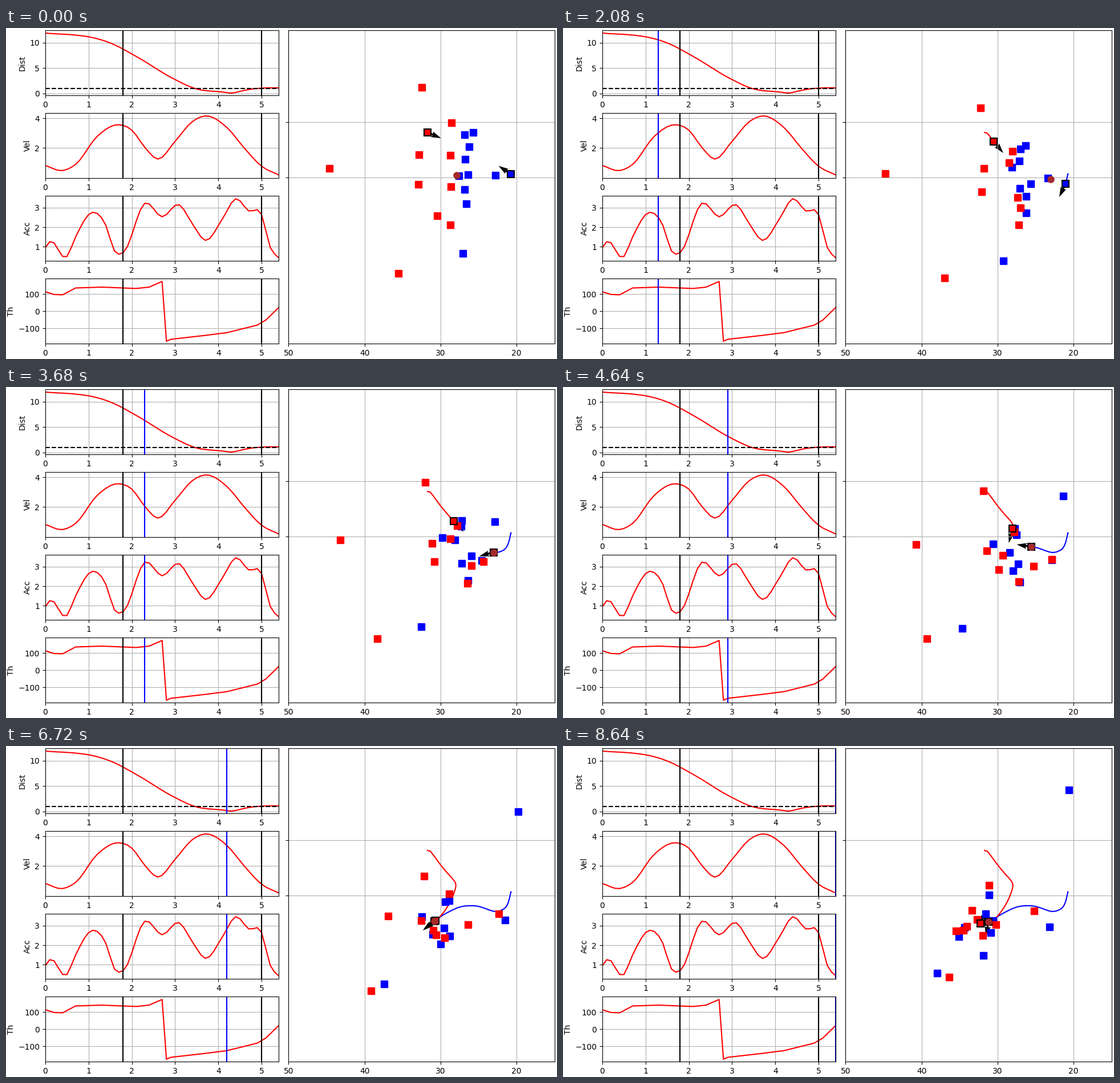
A matplotlib script that plays this animation: 966x580 px, repeating every 8.8 s.

```python
import numpy as np
import matplotlib.pyplot as plt
from matplotlib.animation import FuncAnimation

W, H, DPI = 966, 580, 100
STEPS, DT = 55, 0.1
T = np.arange(STEPS) * DT
YARD = np.array([13.33, 15.69])  # pixels per yard across and down the field


def spline(*keys):
    """Smooth curve through (time, value...) keys, sampled at every step."""
    keys = np.array(keys, float)
    k, v = keys[:, 0], keys[:, 1:]
    slope = np.gradient(v, k, axis=0)
    i = np.clip(np.searchsorted(k, T, side="right") - 1, 0, len(k) - 2)
    h = (k[i + 1] - k[i])[:, None]
    u = np.clip((T - k[i])[:, None] / h, 0, 1)
    out = ((1 + 2 * u) * (1 - u) ** 2 * v[i] + u * (1 - u) ** 2 * h * slope[i]
           + u * u * (3 - 2 * u) * v[i + 1] + u * u * (u - 1) * h * slope[i + 1])
    return out.squeeze()


def route(start, *points):
    """Player path: leaves at `start`, then passes the later points in turn."""
    return spline(*[(t, *p) for t, p in zip((start, 1.8, 3.7, 5.4), points)])


def polar(angle):
    return np.column_stack([np.cos(angle), np.sin(angle)])


SNAP = 0.6
blue = np.array([
    route(SNAP, (819, 183), (805, 221), (780, 264), (741, 294)),
    route(SNAP, (804, 187), (800, 229), (787, 271), (747, 261)),
    route(SNAP, (812, 208), (793, 250), (775, 312), (750, 327)),
    route(SNAP, (805, 230), (775, 254), (739, 290), (704, 318)),
    route(SNAP, (794, 259), (803, 296), (772, 338), (737, 367)),
    route(SNAP, (810, 257), (823, 284), (768, 325), (694, 334)),
    route(SNAP, (858, 258), (848, 259), (897, 136), (887, 77)),
    route(SNAP, (804, 283), (819, 302), (877, 302), (853, 317)),
    route(SNAP, (807, 308), (813, 333), (787, 340), (754, 306)),
    route(SNAP, (801, 395), (751, 415), (671, 422), (656, 398)),
])
red = np.array([
    route(0, (729, 104), (733, 154), (737, 207), (717, 288)),
    route(0, (781, 166), (790, 231), (786, 261), (747, 244)),
    route(SNAP, (724, 222), (745, 261), (735, 300), (708, 316)),
    route(SNAP, (779, 223), (783, 247), (758, 322), (726, 304)),
    route(SNAP, (567, 246), (569, 262), (658, 288), (689, 324)),
    route(SNAP, (723, 274), (741, 296), (767, 331), (702, 323)),
    route(SNAP, (780, 278), (807, 308), (824, 313), (759, 313)),
    route(0, (756, 329), (819, 310), (871, 297), (826, 289)),
    route(SNAP, (779, 345), (809, 345), (781, 338), (736, 332)),
    route(0, (688, 430), (661, 440), (632, 436), (677, 405)),
])

vel = spline((0, 0.83), (0.4, 0.49), (0.7, 0.9), (1.2, 2.78), (1.7, 3.56), (2, 3.2),
             (2.3, 2.05), (2.6, 1.26), (3, 2.45), (3.4, 3.77), (3.7, 4.15),
             (4.2, 3.37), (4.6, 2), (5, 0.78), (5.4, 0.19))
acc = spline((0, 0.95), (0.1, 1.26), (0.5, 0.5), (0.7, 1.5), (1.1, 2.77), (1.4, 2.1),
             (1.6, 0.78), (1.8, 0.7), (2.3, 3.23), (2.7, 2.54), (3.1, 3.15),
             (3.4, 2.18), (3.7, 1.33), (4.1, 2.45), (4.4, 3.46), (4.7, 2.84),
             (5, 2.65), (5.2, 0.97), (5.4, 0.43))
turn = np.interp(T, [0, 0.2, 0.4, 0.7, 1.3, 2.1, 2.4, 2.7, 2.9, 3.7, 4.2, 4.9, 5.1, 5.4],
                 [113, 97, 95, 135, 140, 132, 140, 173, 195, 218, 234, 278, 308, 382])
theta = (turn + 180) % 360 - 180

# The chaser's path follows from its speed and heading.
chaser_dir = polar(np.radians(90 - turn))
motion = vel[:, None] * chaser_dir * YARD * [1, -1]
steps = (motion[1:] + motion[:-1]) / 2 * DT
chaser = np.array([739, 183]) + np.vstack([[0, 0], np.cumsum(steps, axis=0)])

runner = spline((0, 885, 256), (0.7, 885, 257), (1.8, 872, 286), (2.2, 859, 290),
                (2.9, 821, 280), (3.3, 796, 282), (3.7, 770, 294), (4.2, 751, 307),
                (4.8, 747, 309), (5.4, 746, 308))
runner_dir = polar(np.radians(np.interp(
    T, [0, 0.7, 1.8, 2.9, 3.7, 5.4], [-214, -81, -144, -189, -159, -100])))
dist = np.hypot(*((runner - chaser) / YARD).T)

# Snap and handoff, then the ball stays with the runner.
handoff = spline((0, 790, 258), (0.8, 791, 259), (1.2, 848, 262), (1.8, 857, 284),
                 (2.2, 859, 290))
ball = np.where(T[:, None] < 2.2, handoff, runner)

fig = plt.figure(figsize=(W / DPI, H / DPI), dpi=DPI, facecolor="white")


def axes_at(left, top, right, bottom):
    ax = fig.add_axes([left / W, 1 - bottom / H, (right - left) / W, (bottom - top) / H])
    ax.grid(True)
    return ax


def chart(row, name, values, ylim, ticks):
    top = 4.2 + 144.95 * row
    ax = axes_at(68.9, top, 478.44, top + 113.95)
    ax.plot(T, values, color="red")
    ax.set(xlim=(0, 5.4), ylim=ylim, xticks=range(6), yticks=ticks, ylabel=name)
    for event in (1.8, 5.0):
        ax.axvline(event, color="black")
    return ax


charts = [
    chart(0, "Dist", dist, (-0.39, 12.42), [0, 5, 10]),
    chart(1, "Vel", vel, (-0.02, 4.34), [2, 4]),
    chart(2, "Acc", acc, (0.28, 3.61), [1, 2, 3]),
    chart(3, "Th", theta, (-190, 190), [-100, 0, 100]),
]
charts[0].axhline(1, color="black", linestyle="--")
cursors = [ax.axvline(0, color="blue") for ax in charts]

# Field data units are stage pixels.
LEFT, TOP, RIGHT, BOTTOM = 495.3, 4.2, 961.8, 553
field = axes_at(LEFT, TOP, RIGHT, BOTTOM)
field.set(xlim=(LEFT, RIGHT), ylim=(BOTTOM, TOP), yticks=[165, 262])
yards = [50, 40, 30, 20]
field.set_xticks([LEFT + (50 - y) * (RIGHT - LEFT) / 35 for y in yards], yards)
field.set_yticklabels([])


def dots(color, edge=None, marker="s"):
    return field.plot([], [], marker, color=color, markersize=8,
                      markeredgecolor=edge or color,
                      markeredgewidth=1.5 if edge else 1)[0]


arrows = field.quiver([0, 0], [0, 0], [1, 1], [0, 0], color="black",
                      angles="uv", scale=18, width=0.0075)
trails = [field.plot([], [], color=c)[0] for c in ("blue", "red")]
blue_dots, red_dots = dots("blue"), dots("red")
runner_dot, chaser_dot = dots("blue", "black"), dots("red", "black")
ball_dot = dots("brown", marker="o")


def draw(i):
    for line in cursors:
        line.set_xdata([T[i], T[i]])
        line.set_visible(i > 0)
    blue_dots.set_data(*blue[:, i].T)
    red_dots.set_data(*red[:, i].T)
    for dot, path in ((runner_dot, runner), (chaser_dot, chaser), (ball_dot, ball)):
        dot.set_data(*path[i:i + 1].T)
    for trail, path in zip(trails, (runner, chaser)):
        trail.set_data(*path[:i + 1].T)
    arrows.set_offsets([runner[i], chaser[i]])
    arrows.set_UVC(*np.array([runner_dir[i], chaser_dir[i]]).T)
    return []


anim = FuncAnimation(fig, draw, frames=STEPS, interval=160, repeat=True, repeat_delay=0)
plt.show()
```
